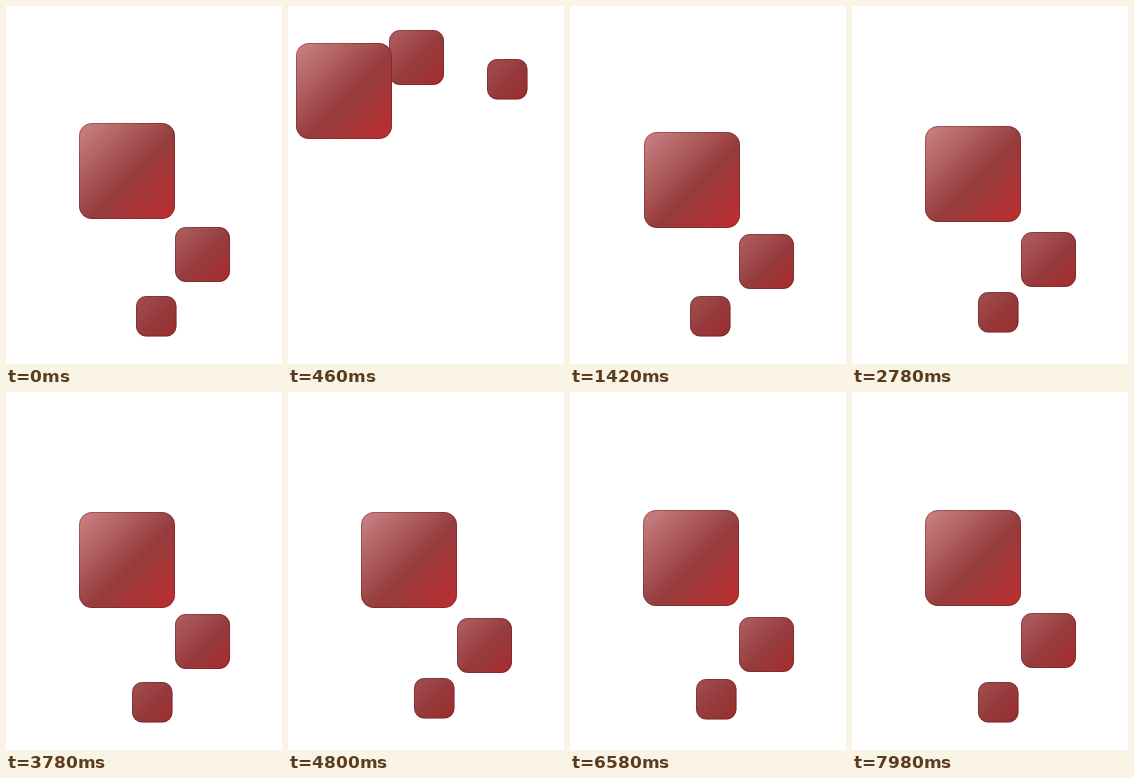
An HTML page with a canvas that plays this animation: 276x358 px, repeating every 8 s.

```html
<!DOCTYPE html>
<html lang="en">
<head>
<meta charset="utf-8">
<title>Orbiting squares</title>
<style>
  html, body { margin: 0; width: 100%; height: 100%; overflow: hidden; background: #fff; }
  canvas { display: block; }
</style>
</head>
<body>
<canvas id="stage" width="276" height="358"></canvas>
<script>
const ctx = document.getElementById("stage").getContext("2d");
const LOOP = 8000;
const FLOAT_PERIOD = 2000;
const ORBIT = { x: 145.7, y: 183.7, r: 133 };
const SPEED = 0.465;                       // degrees per ms
const SPIN_UP = 280, SPIN_DOWN = 760, SPIN_TAIL = 100;
const RISE = 320, RETURN = 800;

// x, y: centre at rest; angle: starting place on the orbit; bob: float distance;
// phase, floatFrom: delay and start of the float; settleX, settleY: time scales
// of the return; nudge: initial x offset
const squares = [
  { x: 146.3, y: 310.4, size: 40.5, radius: 10, angle: 93, bob: -4.5, phase: 0, floatFrom: 2000,
    settleX: 355, settleY: 300, nudge: 4, colors: ["#a15052", "#96393b", "#9c2b2d"] },
  { x: 196.6, y: 248.6, size: 55, radius: 11, angle: 52, bob: 5.5, phase: 0, floatFrom: 0,
    settleX: 190, settleY: 305, nudge: 0, colors: ["#b06162", "#963b3d", "#a92b2d"] },
  { x: 121.1, y: 164.2, size: 96, radius: 13, angle: 17, bob: 7, phase: 270, floatFrom: 0,
    settleX: 215, settleY: 269, nudge: 0, colors: ["#cb8485", "#963c3d", "#be2d2f"] }
];

// Degrees travelled: speeds up, runs evenly, then coasts to a stop.
function spin(t) {
  if (t < SPIN_UP) return SPEED * t * t / (2 * SPIN_UP);
  const steady = SPEED * (Math.min(t, SPIN_DOWN) - SPIN_UP / 2);
  const coast = Math.max(0, t - SPIN_DOWN);
  return steady + SPEED * SPIN_TAIL * (1 - Math.exp(-coast / SPIN_TAIL));
}

// 0 at the resting place, 1 on the orbit.
function orbitShare(t, settle) {
  if (t < RISE) {
    const u = t / RISE;
    return u * u * (3 - 2 * u);
  }
  return Math.exp(-Math.pow(Math.max(0, t - RETURN) / settle, 1.5));
}

function position(s, t) {
  const wave = t < s.floatFrom ? 0 : (1 - Math.cos((t - s.phase) / FLOAT_PERIOD * 2 * Math.PI)) / 2;
  const restX = s.x + s.nudge * Math.max(0, 1 - t / 300);
  const restY = s.y + s.bob * wave;
  const angle = (s.angle - spin(t)) * Math.PI / 180;
  return [
    restX + orbitShare(t, s.settleX) * (ORBIT.x + ORBIT.r * Math.cos(angle) - restX),
    restY + orbitShare(t, s.settleY) * (ORBIT.y + ORBIT.r * Math.sin(angle) - restY)
  ];
}

function drawSquare(s, t) {
  const [cx, cy] = position(s, t);
  const { size } = s;
  ctx.save();
  ctx.translate(Math.round(cx - size / 2), Math.round(cy - size / 2));
  const fill = ctx.createLinearGradient(0, 0, size, size);
  s.colors.forEach((color, i) => fill.addColorStop([0, 0.55, 1][i], color));
  ctx.fillStyle = fill;
  ctx.strokeStyle = "rgba(80, 25, 28, 0.35)";
  ctx.beginPath();
  ctx.roundRect(0, 0, size, size, s.radius);
  ctx.fill();
  ctx.beginPath();
  ctx.roundRect(0.5, 0.5, size - 1, size - 1, s.radius - 0.5);
  ctx.stroke();
  ctx.restore();
}

function frame() {
  const t = performance.now() % LOOP;
  ctx.clearRect(0, 0, 276, 358);
  squares.forEach(s => drawSquare(s, t));
  requestAnimationFrame(frame);
}
frame();
</script>
</body>
</html>
```
